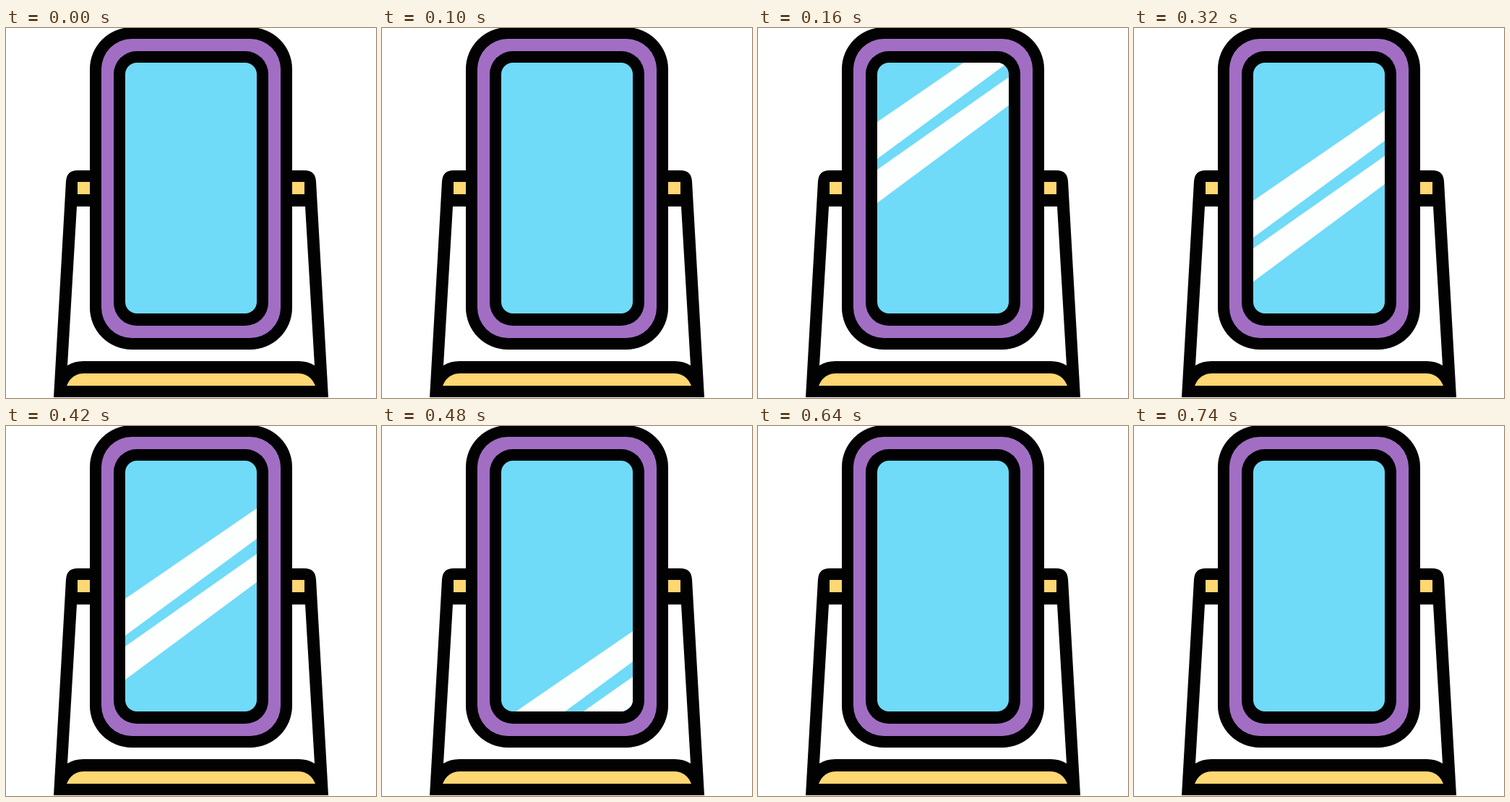
An HTML page with a canvas for the animation above (800 ms loop, 512 px wide and 512 px high).

```html
<!DOCTYPE html>
<html lang="en">
<head>
<meta charset="utf-8">
<title>Shining mirror</title>
<style>
  html, body { margin: 0; width: 100%; height: 100%; overflow: hidden; background: #fff; }
  canvas { display: block; }
</style>
</head>
<body>
<canvas id="stage" width="512" height="512"></canvas>
<script>
const ctx = document.getElementById('stage').getContext('2d');
const BLACK = '#020202', PURPLE = '#a16ec4', BLUE = '#70daf9', YELLOW = '#ffd773';
const STEP = 160;
const STEPS = 5;
const SHINE_OFFSETS = [null, 0, 109, 279, null];
const GLASS = { left: 165, right: 347, top: 48, bottom: 395 };

// Edge heights at the left and right side of the glass
const BANDS = [
  { top: [130, 5], bottom: [181, 47] },
  { top: [196, 68], bottom: [242, 107] }
];

function roundRect(left, top, right, bottom, radius, color) {
  ctx.beginPath();
  ctx.roundRect(left, top, right - left, bottom - top, radius);
  ctx.fillStyle = color;
  ctx.fill();
}

function fillPath(path, color) {
  ctx.fillStyle = color;
  ctx.fill(new Path2D(path));
}

function drawStandHalf() {
  fillPath('M66 511 L83 212 Q84 197 99 197 H120 V247 H98 L85 467 Q94 461 107 461 H257 V511 Z', BLACK);
  fillPath('M99 213 H116 V230 H99 Z', YELLOW);
  fillPath('M84 495 Q91 478 108 478 H257 V495 Z', YELLOW);
}

function drawStand() {
  drawStandHalf();
  ctx.save();
  ctx.translate(512, 0);
  ctx.scale(-1, 1);
  drawStandHalf();
  ctx.restore();
}

function drawFrame() {
  roundRect(116, -1, 396, 445, 58, BLACK);
  roundRect(132, 15, 380, 429, 42, PURPLE);
  roundRect(149, 32, 363, 412, 32, BLACK);
  roundRect(GLASS.left, GLASS.top, GLASS.right, GLASS.bottom, 16, BLUE);
}

function drawShine(offset) {
  const { left, right, top, bottom } = GLASS;
  ctx.save();
  ctx.beginPath();
  ctx.roundRect(left, top, right - left, bottom - top, 16);
  ctx.clip();
  ctx.fillStyle = '#fdfffe';
  for (const band of BANDS) {
    ctx.beginPath();
    ctx.moveTo(left, band.top[0] + offset);
    ctx.lineTo(right, band.top[1] + offset);
    ctx.lineTo(right, band.bottom[1] + offset);
    ctx.lineTo(left, band.bottom[0] + offset);
    ctx.fill();
  }
  ctx.restore();
}

const start = performance.now();

function render(now) {
  const elapsed = Math.max(0, now - start);
  const offset = SHINE_OFFSETS[Math.floor(elapsed / STEP) % STEPS];
  ctx.fillStyle = '#fff';
  ctx.fillRect(0, 0, 512, 512);
  drawStand();
  drawFrame();
  if (offset !== null) drawShine(offset);
  requestAnimationFrame(render);
}

render(start);
</script>
</body>
</html>
```
